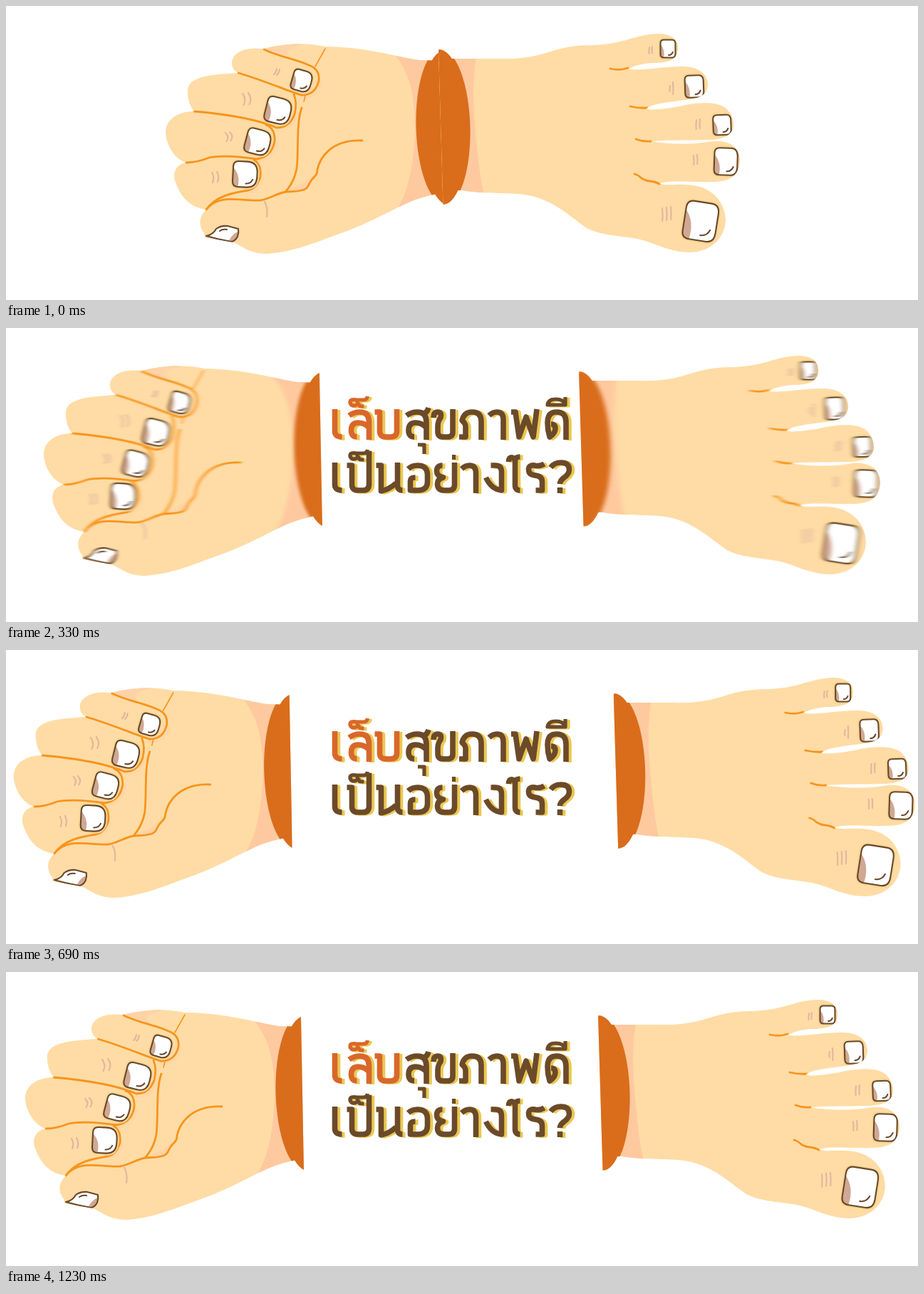
These frames come from a looping animation (1280x413 px, 2700 ms). An HTML page:

```html
<!DOCTYPE html>
<html lang="th">
<head>
<meta charset="utf-8">
<title>เล็บสุขภาพดี เป็นอย่างไร?</title>
<style>
html, body { margin: 0; width: 100%; height: 100%; overflow: hidden; background: #fff; }
svg { display: block; width: 100%; height: 100%; }
path { fill: none; }
.skin { fill: #ffdca5; }
.shade { fill: #ffc9a0; }
.soft { fill: #ffd3a6; }
.glow { stroke: #ffd3a6; stroke-width: 12; opacity: .5; }
.cuff { fill: #d96d1c; }
.line { stroke: #f7941d; stroke-width: 2.8; stroke-linecap: round; stroke-linejoin: round; }
.thin { stroke-width: 1.6; }
.mark { stroke: #dfb8a0; stroke-width: 2.2; stroke-linecap: round; }
.halo { stroke: #f6d592; stroke-width: 6; }
.plate { fill: #fff; }
.lunula { fill: #d0a893; }
.rim { stroke: #69482a; stroke-width: 2.1; stroke-linejoin: round; stroke-linecap: round; }
.letters path { stroke-linejoin: round; }
</style>
</head>
<body>
<svg viewBox="0 0 1280 413" preserveAspectRatio="none">
  <defs>
    <clipPath id="handClip">
      <path d="M611 77L580 76C545 71 510 58 449 57C420 51 395 52 360 60C335 57 317 66 317 80Q317 90 326 94
        C295 96 258 97 255 117Q254 136 264 148C240 148 224 160 224 178C225 195 236 215 253 220
        C238 222 233 236 238 248C244 264 255 283 281 286C270 297 270 309 278 319L279 325L318 332
        C330 335 340 349 368 348C400 346 430 334 465 321C500 309 530 293 552 282Q575 270 600 265L614 262Z"/>
      <path d="M611 63A38 109 -1.6 0 0 615 278Z"/>
    </clipPath>
    <clipPath id="footClip">
      <path d="M607.5 74L690 74C760 76 760 56 820 55C870 54 880 40 915 39C935 39 944 48 943 61
        C942 78 925 80 905 80C895 81 878 84 874 89C895 91 920 85 950 85C975 85 986 98 985 112
        C983 128 970 130 945 133C920 136 905 139 899 144C900 147 925 145 945 141
        C970 135 1000 133 1012 145Q1021 155 1021 168C1020 182 1005 188 985 188
        C950 189 925 188 905 190C925 194 960 195 985 191C1010 186 1030 195 1030 218
        C1028 240 1015 247 990 247C960 248 935 244 917 249C925 253 940 250 955 251
        C990 252 1010 275 1010 302C1008 330 985 346 960 346C930 346 910 332 885 327
        C855 322 835 322 815 312C790 295 765 268 720 264C690 262 670 264 640 259L613 259Z"/>
      <path d="M607 61A38 109 -1.6 0 1 613.5 279Z"/>
    </clipPath>
    <filter id="handBlur" color-interpolation-filters="sRGB"><feGaussianBlur stdDeviation="0"/></filter>
    <filter id="footBlur" color-interpolation-filters="sRGB"><feGaussianBlur stdDeviation="0"/></filter>
  </defs>

  <g class="letters" id="letters" role="img" aria-label="เล็บสุขภาพดี เป็นอย่างไร?"></g>

  <g id="hand" clip-path="url(#handClip)">
    <path class="skin" d="M200 30H630V370H200Z"/>
    <g id="handDetail">
      <path class="shade" d="M546 69C570 100 573 130 574 170C573 220 565 260 549 285L640 285V69Z"/>
      <path class="soft" d="M362 61Q390 48 418 54Q385 60 400 74Q380 70 362 61Z"/>
      <path class="soft" d="M393 260Q420 250 437 233Q428 246 425 254Q412 260 393 260Z"/>
      <path class="glow" d="M439 105Q434 126 414 125M405 152Q398 171 380 171M377 190Q373 212 352 215M357 240Q352 256 340 259"/>
      <path class="line" d="M362 61C385 72 405 74 425 83Q441 89 439 105Q434 126 414 125C395 119 360 104 326 94"/>
      <path class="line" d="M404 124Q409 136 405 152Q398 171 380 171C350 158 310 152 264 148"/>
      <path class="line" d="M365 167Q378 172 377 190Q373 212 352 215C320 210 300 210 285 213Q268 220 253 220"/>
      <path class="line" d="M348 216Q359 223 357 240Q352 256 340 259C320 262 295 266 281 286"/>
      <path class="line" d="M281 286C300 262 330 275 357 273C370 271 380 263 393 261C425 260 422 256 426 249C430 240 437 240 437 230C440 215 455 187 500 189"/>
      <path class="line thin" d="M448 60L434 85M420 126L418 134"/>
      <path class="line" d="M415 143C407 165 411 205 408 228Q405 246 393 260"/>
      <path class="mark" d="M363 275Q368 284 366 296"/>
    </g>
  </g>

  <g id="foot" clip-path="url(#footClip)">
    <path class="skin" d="M600 30H1050V370H600Z"/>
    <g id="footDetail">
      <path class="shade" d="M590 60H662C655 95 655 130 658 165C661 200 664 235 672 270H590Z"/>
      <path class="line" d="M848 88Q862 91 873 87M876 141Q890 144 900 143M884 187Q894 191 905 190M882 236Q887 237 892 242Q899 246 904 246Q912 247 917 250"/>
    </g>
  </g>
</svg>
<script>
const $ = id => document.getElementById(id);

function add(parent, d, cls, attrs = {}) {
  const p = document.createElementNS('http://www.w3.org/2000/svg', 'path');
  p.setAttribute('d', d);
  if (cls) p.setAttribute('class', cls);
  for (const k in attrs) p.setAttribute(k, attrs[k]);
  parent.appendChild(p);
}

// Rounded nail; `r` sets how round the free edge is.
function nail(parent, cx, cy, w, h, turn, r) {
  const a = w / 2, b = h / 2, c = a * 0.45, e = a * (1 - r), f = b * (1 - r);
  const at = { transform: `translate(${cx} ${cy}) rotate(${turn})` };
  const shape = `M${-a} ${-b + c}Q${-a} ${-b} ${-a + c} ${-b}H${e}Q${a} ${-b} ${a} ${-f}V${f}` +
    `Q${a} ${b} ${e} ${b}H${-a + c}Q${-a} ${b} ${-a} ${b - c}Z`;
  add(parent, shape, 'halo', at);
  add(parent, shape, 'plate', at);
  add(parent, `M${-a} ${-b * 0.5}Q${-a * 0.35} ${b * 0.1} ${-a * 0.55} ${b}H${-a + c}Q${-a} ${b} ${-a} ${b - c}Z`, 'lunula', at);
  add(parent, shape, 'rim', at);
  add(parent, `M${a * 0.1} ${b * 0.72}Q${a * 0.5} ${b * 0.72} ${a * 0.65} ${b * 0.38}`, 'rim', at);
}

function marks(parent, x, y, h, n, gap, bend) {
  for (let i = 0; i < n; i++)
    add(parent, `M${x + i * gap} ${y - i}q${bend} ${h / 2} ${bend / 4} ${h}`, 'mark');
}

const hd = $('handDetail'), fd = $('footDetail');
[[415, 105, 27, 29, 16, 0.8], [382, 147, 35, 36, 14, 0.85],
 [353.5, 191, 34, 35, 15, 0.85], [335.5, 236.5, 34, 36, 3, 0.85]].forEach(n => nail(hd, ...n));
[[929, 60, 21, 25, 0, 0.45], [966, 113, 26, 31, -2, 0.5], [1005, 167, 25, 28, -2, 0.5],
 [1010.3, 218.5, 32.5, 38, 2, 0.6], [975, 302.5, 46, 54, 9, 0.5]].forEach(n => nail(fd, ...n));

const thumb = 'M281 323Q291 321 295 313Q302 308 311 309L326 313Q327 318 325 324Q321 331 316 331Q298 328 281 323Z';
add(hd, thumb, 'plate');
add(hd, 'M325 317Q316 322 313 330L316 331Q323 330 325 322Z', 'lunula');
add(hd, thumb, 'rim');
add(hd, 'M300 316Q304 313 310 314', 'rim');

[[380, 88], [384, 89]].forEach(([x, y]) => add(hd, `M${x} ${y}q-1 6 -4 8`, 'mark'));
marks(hd, 332, 123, 16, 2, 8, 6);
marks(hd, 308, 178, 12, 2, 6, 6);
marks(hd, 289, 234, 14, 2, 7, 4);
marks(fd, 903, 58, 9, 2, 4, -1);
marks(fd, 936, 107, 17, 1, 5, 1);
marks(fd, 932, 112, 8, 1, 5, -1);
marks(fd, 969, 160, 13, 2, 5, -1);
marks(fd, 965, 210, 13, 2, 5, 1);
marks(fd, 921, 284, 18, 3, 6, 1);

for (const g of [hd, fd]) add(g, 'M611 61A38 109 -1.6 0 1 616 279A38 109 -1.6 0 1 611 61Z', 'cuff');

// Thai is missing from the available fonts, so each letter is a pen stroke from its baseline.
const glyphs = {
  'เ': 'M7 -43V-12Q7 -4 17 -4',
  'ล': 'M5 -34Q12 -39 20 -39Q33 -39 33 -25V0M33 -17Q26 -24 18 -24Q8 -24 8 -13Q8 -4 16 -4',
  'บ': 'M2 -39H9V-12Q9 -4 17 -4H24Q33 -4 33 -12V-43',
  'ส': 'M5 -34Q12 -39 20 -39Q33 -39 33 -25V0M33 -17Q26 -24 18 -24Q8 -24 8 -13Q8 -4 16 -4M27 -36Q34 -37 36 -45',
  'ข': 'M4 -31Q4 -39 10 -39Q16 -39 14 -31Q10 -26 10 -19V-11Q10 -4 17 -4H24Q31 -4 31 -11V-43',
  'ภ': 'M2 -4H11V-19Q11 -23 6 -27Q9 -39 20 -39Q33 -39 33 -26V0',
  'า': 'M4 -34Q9 -39 15 -39Q24 -39 24 -28V0',
  'พ': 'M2 -39H8L13 -4L23 -32L33 -4L38 -43',
  'ด': 'M34 0V-25Q34 -39 21 -39Q8 -39 8 -24Q8 -14 11 -4Q19 -9 19 -16Q19 -22 13 -22',
  'ป': 'M2 -39H9V-12Q9 -4 17 -4H24Q33 -4 33 -12V-59',
  'น': 'M2 -39H9V-3Q20 -5 30 -14M32 -43V-11Q32 -4 39 -4',
  'อ': 'M5 -34Q10 -39 18 -39Q32 -39 32 -26V-16Q32 -4 19 -4H8V-17Q8 -22 15 -22',
  'ย': 'M15 -39Q7 -39 7 -31Q7 -24 16 -22Q8 -20 8 -13Q8 -4 17 -4H24Q32 -4 32 -12V-43',
  'ง': 'M12 -39H18Q27 -39 27 -30V-4Q13 -5 5 -22',
  'ไ': 'M3 -44Q3 -51 8 -50L12 -47Q13 -51 19 -51M12 -47V-11Q12 -4 19 -4',
  'ร': 'M28 -41Q21 -37 14 -39Q6 -40 6 -33Q6 -26 15 -25Q25 -24 25 -16V-4H16',
  '?': 'M3 -36Q8 -43 17 -43Q29 -43 29 -33Q29 -27 22 -22Q16 -18 16 -13M16 -8V0'
};
const signs = {
  '็': 'M17 -51Q14 -47 10 -48Q5 -50 7 -55Q9 -57 16 -56H25Q30 -56 31 -61M15 -51Q18 -53 20 -47H26',
  'ุ': 'M21 7H30V20',
  'ี': 'M8 -49Q9 -57 20 -57Q30 -57 33 -49ZM33 -49V-60',
  '่': 'M31 -54V-47'
};
const wide = { 'เ': 22, 'ล': 39, 'บ': 41, 'ส': 39, 'ข': 38, 'ภ': 40, 'า': 33, 'พ': 45, 'ด': 41,
  'ป': 41, 'น': 42, 'อ': 38, 'ย': 38, 'ง': 34, 'ไ': 25, 'ร': 34, '?': 35 };

function write(text, x, y, color) {
  let base = x;
  for (const ch of text) {
    if (wide[ch]) { base = x; x += wide[ch]; }
    add($('letters'), glyphs[ch] || signs[ch], '', {
      transform: `translate(${base} ${y})`, stroke: color, 'stroke-width': wide[ch] ? 7.6 : 5.2
    });
  }
}

const lines = [['เล็บ', 454.5, 157, '#d9672b'], ['สุขภาพดี', 557, 157, '#6b4a2a'], ['เป็นอย่างไร?', 454.5, 232, '#6b4a2a']];
lines.forEach(([s, x, y]) => write(s, x + 4, y + 1, '#ecc851'));
lines.forEach(l => write(...l));

const LOOP = 2700, STEP = 30;
const wave = k => (1 - Math.cos(Math.PI * k)) / 2;

// Opens to `first`, drifts on to `peak`, then settles at `rest`.
function slide(t, first, peak, rest) {
  if (t <= 450) return first * wave(t / 450);
  if (t <= 540) return first;
  if (t <= 780) return first + (peak - first) * wave((t - 540) / 240);
  return peak + (rest - peak) * Math.sin(Math.PI / 2 * Math.min(1, (t - 780) / 450));
}

function place(name, t, ...stops) {
  const x = slide(t, ...stops);
  const speed = t < 450 ? Math.abs(stops[0]) * Math.sin(Math.PI * t / 450) * 0.105 : 0;
  const blur = speed * 0.16;
  $(name).setAttribute('transform', `translate(${x.toFixed(2)} 0)`);
  const detail = $(name + 'Detail');
  if (blur > 0.3) {
    $(name + 'Blur').firstElementChild.setAttribute('stdDeviation', `${blur.toFixed(2)} 0.5`);
    detail.setAttribute('filter', `url(#${name}Blur)`);
  } else detail.removeAttribute('filter');
}

function draw(t) {
  t = Math.floor(t / STEP) * STEP;
  place('hand', t, -205, -217, -197);
  place('foot', t, 236, 250, 224);
}

const start = performance.now();
function tick() {
  draw((performance.now() - start) % LOOP);
  requestAnimationFrame(tick);
}
draw(0);
requestAnimationFrame(tick);
</script>
</body>
</html>
```
